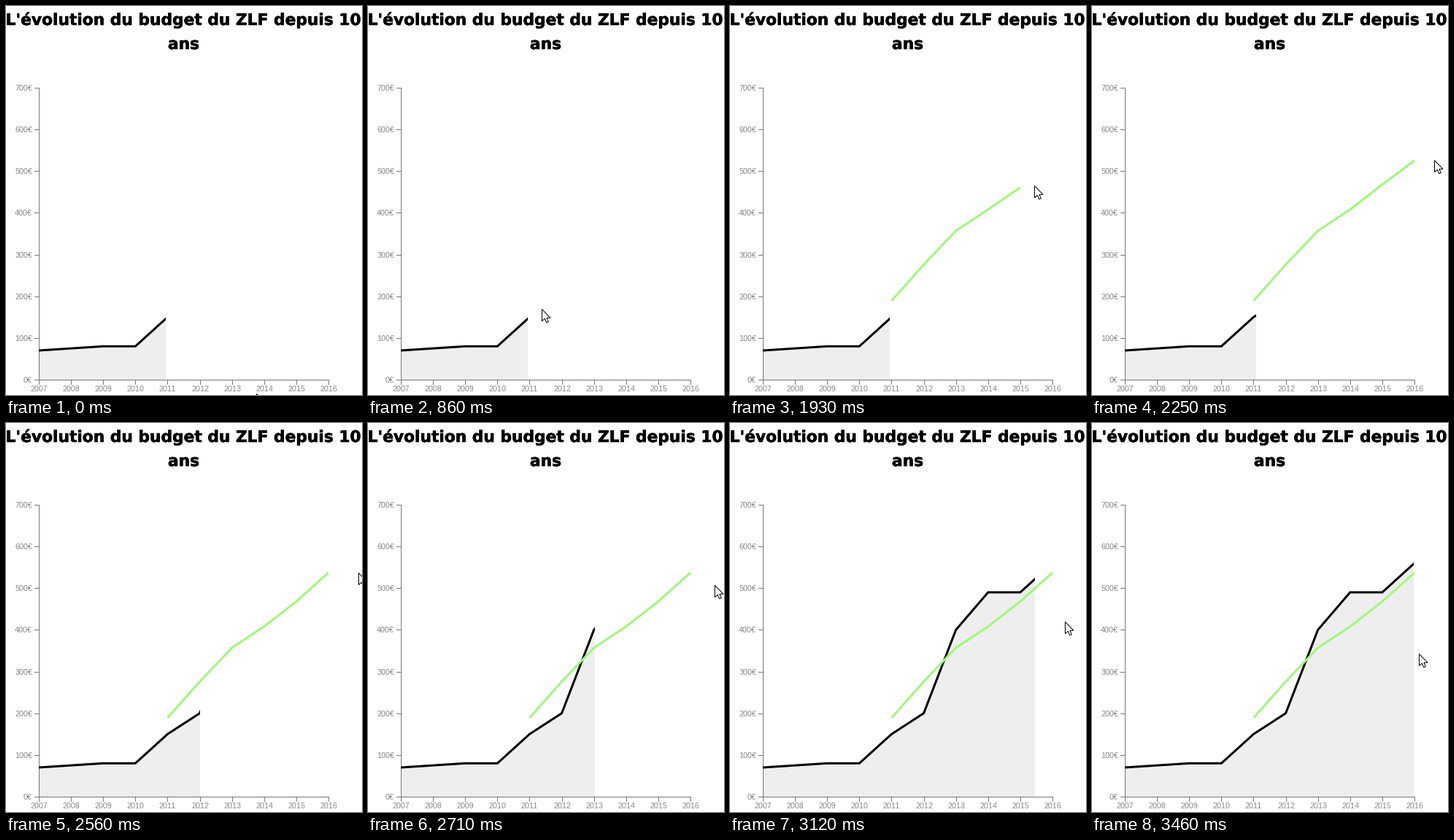
Write a matplotlib script that moves like this. It is 488x533 px and loops after 3.53 s.

```python
import numpy as np
import matplotlib.pyplot as plt
from matplotlib.animation import FuncAnimation
from matplotlib.collections import LineCollection
from matplotlib.patches import Polygon, Rectangle
from matplotlib.patheffects import withStroke

W, H, DPI = 488, 533, 100
LOOP, TICK = 3530, 10
GRAB, LAST = 77, 44            # ms between screen grabs, number of the last one
DRAG, DROP = 11, 31            # grabs between which the mouse draws
LEFT, BOTTOM, RIGHT, TOP = 45, 512, 442, 112
FIRST = 4                      # index of 2011, where the guess begins

budget = np.array([70, 75, 80, 80, 150, 200, 400, 490, 490, 560])
guess = np.array([189, 276, 357, 408, 468, 537])

# Mouse waypoints: grab, x, y
mouse = np.array([
    (0, 343, 531), (2, 257, 467), (6, 219, 445), (10, 219, 445),
    (11, 238, 415), (17, 293, 347), (20, 341, 296), (25, 417, 246),
    (28, 462, 214), (31, 483, 205), (33, 483, 205), (37, 467, 239),
    (44, 448, 316)])


def pt(n):
    return n * 72 / DPI


def x_at(i):
    return LEFT + (RIGHT - LEFT) * i / 9


def y_at(v):
    return BOTTOM - (BOTTOM - TOP) * v / 700


def tip(k):
    return np.array([np.interp(k, mouse[:, 0], mouse[:, c]) for c in (1, 2)])


def ease(u):
    u = np.clip(u, 0, 1)
    return 4 * u ** 3 if u < 0.5 else 1 - (2 - 2 * u) ** 3 / 2


def reveal_x(k):
    start = x_at(FIRST) - 2
    return start + (RIGHT - start) * ease(0.0468 * (k - 25))


def guess_line(k):
    """Points of the hand-drawn line; the newest one trails the mouse."""
    if k < DRAG:
        return [], []
    k = min(k, DROP + 1)
    (x, y), (_, y0) = tip(k), tip(k - 1)
    n = int(np.clip(round(9 * (x - LEFT) / (RIGHT - LEFT)) - FIRST, 0, 5))
    return x_at(FIRST + np.arange(n + 1)), [*y_at(guess[:n]), y + 0.25 * (y0 - y)]


fig = plt.figure(figsize=(W / DPI, H / DPI), dpi=DPI, facecolor="white")
ax = fig.add_axes([0, 0, 1, 1])
ax.axis("off")

for line, base in (("L'évolution du budget du ZLF depuis 10", 26), ("ans", 59)):
    ax.text(243.5, base, line, ha="center", va="baseline", color="black",
            family="DejaVu Sans", weight="bold", size=pt(21.75),
            path_effects=[withStroke(linewidth=pt(0.6), foreground="black")])

# Axes sit on pixel centres
label = dict(family="Liberation Sans", size=pt(10.7), color="#888888",
             va="baseline")
rules = [[(LEFT, TOP), (LEFT, BOTTOM)], [(LEFT, BOTTOM), (RIGHT, BOTTOM)]]
for v in range(0, 701, 100):
    y = round(y_at(v))
    rules.append([(LEFT - 6, y), (LEFT, y)])
    ax.text(LEFT - 9, y + 4, f"{v}€", ha="right", **label)
for i in range(10):
    x = round(x_at(i))
    rules.append([(x, BOTTOM), (x, BOTTOM + 6)])
    ax.text(x + 0.5, BOTTOM + 16, str(2007 + i), ha="center", **label)
ax.add_collection(LineCollection(np.array(rules) + 0.5, colors="#777777",
                                 linewidths=pt(1), capstyle="projecting",
                                 snap=False, zorder=2))

xs, ys = x_at(np.arange(10)), y_at(budget)
outline = [*zip(xs, ys), (RIGHT, BOTTOM), (LEFT, BOTTOM)]
area = ax.add_patch(Polygon(outline, fc="#eeeeee", ec="none", zorder=1))
stroke = dict(lw=pt(3), solid_capstyle="butt", solid_joinstyle="miter")
real, = ax.plot(xs, ys, color="black", zorder=3, **stroke)
drawn, = ax.plot([], [], color="#a0f77c", zorder=4, **stroke)

arrow = np.array([(0, 0), (0, 16.2), (3.8, 12.8), (6.3, 18.3), (8.8, 17.2),
                  (6.5, 12), (11.5, 11.8)])
cursor = ax.add_patch(Polygon(arrow, fc="white", ec="black", lw=pt(1),
                              joinstyle="miter", zorder=5))
ax.set(xlim=(0, W), ylim=(H, 0))


def update(i):
    k = min(i * TICK // GRAB, LAST)
    window = Rectangle((LEFT, 0), reveal_x(k) - LEFT, BOTTOM,
                       transform=ax.transData)
    area.set_clip_path(window)
    real.set_clip_path(window)
    drawn.set_data(*guess_line(k))
    cursor.set_xy(arrow + np.round(tip(k)) + 0.5)
    return area, real, drawn, cursor


anim = FuncAnimation(fig, update, frames=LOOP // TICK, interval=TICK,
                     repeat=True, repeat_delay=0, blit=False)
plt.show()
```
